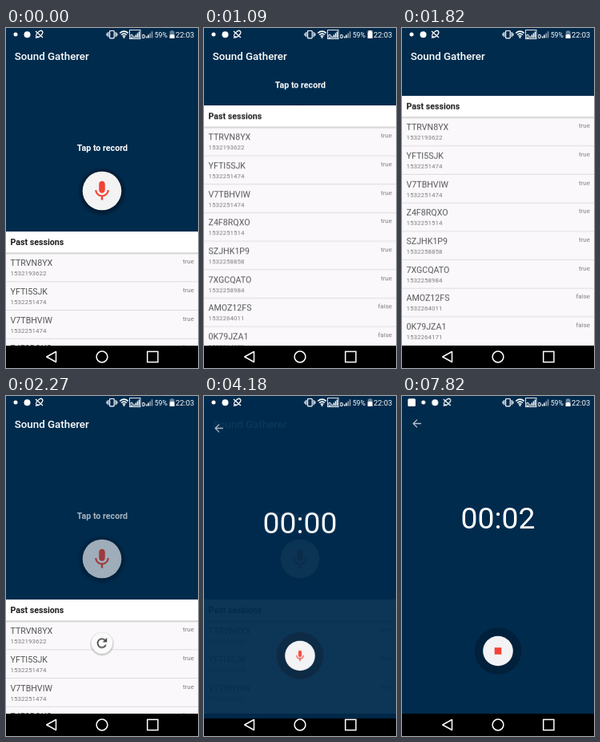
An HTML page that plays this animation: 240x426 px, repeating every 8000 ms.

```html
<!DOCTYPE html>
<html lang="en">
<head>
<meta charset="utf-8">
<title>Recorder</title>
<style>
html, body { margin: 0; width: 100%; height: 100%; overflow: hidden; background: #000; }
svg { display: block; width: 100vw; height: 100vh; font-family: Roboto, "Open Sans", sans-serif; }
.move, .fade, .pull, .spin, .press, .screen, .tap, .mic, .stop, .note, .icons, .s0, .s1, .s2 {
  animation: 8s linear infinite;
}
.move { animation-name: move; }
.fade { animation-name: fade; }
.pull { animation-name: pull; }
.spin { animation-name: spin; }
.press { animation-name: press; }
.screen { animation-name: screen; }
.tap { animation-name: tap; }
.mic, .stop, .note, .icons, .s0, .s1, .s2 { animation-timing-function: step-end; }
.mic { animation-name: mic; }
.stop { animation-name: stop; }
.note { animation-name: note; }
.icons { animation-name: icons; }
.s0 { animation-name: s0; }
.s1 { animation-name: s1; }
.s2 { animation-name: s2; }
.charge { animation: charge 2s step-end -470ms infinite; }

/* Sheet drag; --k sets the parallax share */
@keyframes move {
  0%, 7.2% { transform: none; animation-timing-function: cubic-bezier(.4, 0, .8, .9); }
  13.625% { transform: translateY(calc(var(--k) * -157.5px)); animation-timing-function: ease-out; }
  17.5% { transform: translateY(calc(var(--k) * -201px)); animation-timing-function: cubic-bezier(.6, 0, .9, .6); }
  22.75% { transform: translateY(calc(var(--k) * -170.5px)); animation-timing-function: cubic-bezier(.3, .2, .6, 1); }
  27.25%, 100% { transform: none; }
}
@keyframes fade {
  0%, 14% { opacity: 1; }
  21.5%, 23.5% { opacity: 0; }
  31%, 100% { opacity: 1; }
}
@keyframes pull {
  0%, 27% { transform: translateY(-44px); }
  28.375% { transform: none; animation-timing-function: ease-out; }
  30.6%, 32.5% { transform: translateY(15px); }
  34%, 100% { transform: translateY(12px); }
}
@keyframes spin {
  0%, 27% { transform: rotate(-60deg); }
  28.375% { transform: none; }
  30.6% { transform: rotate(50deg); }
  35% { transform: rotate(260deg) scale(1); }
  37.4%, 100% { transform: rotate(330deg) scale(0); }
}
@keyframes press { 0%, 49.8% { opacity: 0; } 51.5%, 100% { opacity: .12; } }
@keyframes screen {
  0%, 51% { opacity: 0; transform: translateY(34px); animation-timing-function: ease-out; }
  52.25% { opacity: .95; transform: translateY(6px); animation-timing-function: ease-out; }
  53.6% { opacity: 1; transform: translateY(1px); }
  55.5%, 100% { opacity: 1; transform: none; }
}
@keyframes tap {
  0%, 69.2% { opacity: 0; }
  71.5%, 75% { opacity: .06; }
  77.9%, 100% { opacity: 0; }
}
@keyframes mic { 0% { opacity: 1; } 72.5%, 100% { opacity: 0; } }
@keyframes stop { 0% { opacity: 0; } 72.5%, 100% { opacity: 1; } }
@keyframes note { 0% { opacity: 0; } 72.5%, 100% { opacity: 1; } }
@keyframes icons { 0% { transform: none; } 72.5%, 100% { transform: translateX(14.7px); } }
@keyframes s0 { 0% { opacity: 1; } 85.2%, 100% { opacity: 0; } }
@keyframes s1 { 0% { opacity: 0; } 85.2% { opacity: 1; } 97.7%, 100% { opacity: 0; } }
@keyframes s2 { 0% { opacity: 0; } 97.7%, 100% { opacity: 1; } }
@keyframes charge {
  0% { transform: scaleY(.5); }
  25% { transform: scaleY(.62); }
  50% { transform: scaleY(.85); }
  75%, 100% { transform: none; }
}
</style>
</head>
<body>
<svg viewBox="0 0 240 426" preserveAspectRatio="none">
  <defs>
    <path id="micShape" fill="#f44336" d="M12 14c1.66 0 3-1.34 3-3V5c0-1.66-1.34-3-3-3S9 3.34 9 5v6c0 1.66 1.34 3 3 3zm5.3-3c0 3-2.54 5.1-5.3 5.1S6.7 14 6.7 11H5c0 3.41 2.72 6.23 6 6.72V21h2v-3.28c3.28-.48 6-3.3 6-6.72z"/>
    <radialGradient id="glow">
      <stop offset=".78" stop-color="#001426" stop-opacity=".75"/>
      <stop offset="1" stop-color="#001426" stop-opacity="0"/>
    </radialGradient>
    <radialGradient id="soft">
      <stop offset=".8" stop-opacity=".28"/>
      <stop offset="1" stop-opacity="0"/>
    </radialGradient>
    <linearGradient id="edge" x2="0" y2="1">
      <stop stop-color="#000" stop-opacity=".24"/>
      <stop offset="1" stop-color="#000" stop-opacity="0"/>
    </linearGradient>
    <clipPath id="listArea"><path d="M0 282H240V398H0z"/></clipPath>
  </defs>

  <rect width="240" height="426" fill="#002b4d"/>

  <!-- Home -->
  <g class="move" style="--k:.5">
    <g class="fade">
      <text x="120.4" y="154" font-size="10.67" font-weight="700" fill="#fff" text-anchor="middle">Tap to record</text>
      <circle cx="120" cy="205" r="31" fill="url(#glow)"/>
      <circle cx="120" cy="204" r="24.3" fill="#f3f3f3"/>
      <use href="#micShape" transform="translate(105 189.2) scale(1.25)"/>
      <circle class="press" cx="120" cy="204" r="24.3"/>
    </g>
  </g>
  <text x="10.7" y="39.7" font-size="13.33" font-weight="500" fill="#fff">Sound Gatherer</text>
  <g class="move" style="--k:1">
    <rect y="255" width="240" height="400" fill="#faf8fb"/>
    <g id="rows"></g>
    <rect y="255" width="240" height="27" fill="#fff"/>
    <rect y="281.5" width="240" height="2.5" fill="url(#edge)"/>
    <text x="5.5" y="272" font-size="10.67" font-weight="700" fill="#1c1c1c">Past sessions</text>
  </g>
  <g clip-path="url(#listArea)">
    <g class="pull">
      <g transform="translate(120 309.5)">
        <g class="spin">
          <circle cy="1" r="15.5" fill="url(#soft)"/>
          <circle r="13.3" fill="#fafafa"/>
          <path d="M4.9 2.2A5.4 5.4 0 1 1 3.6 -4" fill="none" stroke="#444" stroke-width="1.7"/>
          <path d="M6.2 -6.7V-1.2H.7z" fill="#444"/>
        </g>
      </g>
    </g>
  </g>
  <rect y="398" width="240" height="28"/>

  <!-- Recorder -->
  <g class="screen">
    <rect width="240" height="398" fill="#002b4d"/>
    <rect y="398" width="240" height="28"/>
    <path transform="translate(10.5 26.5) scale(.667)" fill="#b5c2cc" d="M20 11H7.83l5.59-5.59L12 4l-8 8 8 8 1.41-1.41L7.83 13H20z"/>
    <g font-size="37.33" fill="#fff" text-anchor="middle">
      <text class="s0" x="120" y="166">00:00</text>
      <text class="s1" x="120" y="166">00:01</text>
      <text class="s2" x="120" y="166">00:02</text>
    </g>
    <circle cx="120" cy="319.5" r="29.3" fill="#00203b"/>
    <circle cx="120" cy="319.5" r="18.8" fill="#f3f2f5"/>
    <g class="mic"><use href="#micShape" transform="translate(111.6 311.4) scale(.7)"/></g>
    <rect class="stop" x="115.7" y="315.2" width="8.6" height="8.6" fill="#f44336"/>
    <circle class="tap" cx="120" cy="319.5" r="18.8"/>
  </g>

  <!-- Status bar -->
  <g fill="#fff">
    <rect class="note" x="7.3" y="3.3" width="9.6" height="9.6" rx="1.5"/>
    <g class="icons">
      <circle cx="12" cy="8" r="2.5"/>
      <circle cx="26.5" cy="8.3" r="4"/>
      <g fill="none" stroke="#fff" stroke-width="1.3">
        <ellipse cx="41.7" cy="7.5" rx="5" ry="2.7" transform="rotate(-45 41.7 7.5)"/>
        <path d="M37 4l9 8M37 12.5l3-2"/>
      </g>
    </g>
    <g fill="none" stroke="#fff" stroke-width="1.2">
      <rect x="129.6" y="3.5" width="5.6" height="9.3" rx=".8"/>
      <path d="M127.7 5v6.3M137.2 5v6.3M126 6.5v3.3M138.9 6.5v3.3"/>
      <path d="M142.3 6.3q5.2-4.3 10.4 0M144 8.5q3.5-2.8 7 0M145.7 10.5q1.8-1.4 3.6 0" stroke-width="1.6"/>
      <rect x="154.6" y="2.6" width="13.4" height="11" stroke-width=".9"/>
    </g>
    <circle cx="147.5" cy="12" r="1"/>
    <path d="M159.5 10.5h1.5v2h-1.5zM161.6 8.5h1.5v4h-1.5zM163.7 6.5h1.4v6h-1.4zM165.7 4.5h1.4v8h-1.4z"/>
    <path d="M175 10.5h1.5v2H175zM177.2 8.5h1.5v4h-1.5z"/>
    <path d="M179.5 6.5h1.5v6h-1.5zM181.8 4.2h1.5v8.3h-1.5z" opacity=".55"/>
    <g font-size="6.5" font-weight="700">
      <text x="155.3" y="12.6">D</text>
      <text x="170" y="12.6">D</text>
    </g>
    <text x="185.7" y="11.7" font-size="8.67">59%</text>
    <path d="M206.3 3h2.6v1H210.5v9H204.7V4h1.6z" opacity=".4"/>
    <g transform="translate(207.6 13)"><path class="charge" d="M-2.9 0V-9H-1.3V-10H1.3V-9H2.9V0z"/></g>
    <text x="235.3" y="11.7" font-size="9.33" text-anchor="end">22:03</text>
  </g>

  <!-- Navigation bar -->
  <g fill="none" stroke="#fff" stroke-width="1.5">
    <path d="M62.5 405.5V418.5L50.7 412z" stroke-linejoin="round"/>
    <circle cx="120" cy="412" r="6.9"/>
    <rect x="176.7" y="405.4" width="13.2" height="13.2"/>
  </g>
</svg>
<script>
const sessions = `TTRVN8YX 1532193622 true
YFTI5SJK 1532251474 true
V7TBHVIW 1532251474 true
Z4F8RQXO 1532251514 true
SZJHK1P9 1532258858 true
7XGCQATO 1532258984 true
AMOZ12FS 1532264011 false
0K79JZA1 1532264171 false
Q3MWL7DE 1532264305 true`;

document.getElementById('rows').innerHTML = sessions.split('\n').map((line, i) => {
  const [id, stamp, sent] = line.split(' ');
  return `<g transform="translate(0 ${282.3 + i * 35.67})">
    <text x="5.5" y="16" font-size="10.67" fill="#555">${id}</text>
    <text x="5.5" y="28" font-size="8" fill="#7c7c7c">${stamp}</text>
    <text x="235" y="13" font-size="8" fill="#7c7c7c" text-anchor="end">${sent}</text>
    <rect y="35.2" width="240" height=".8" fill="#d6d6d6"/>
  </g>`;
}).join('');
</script>
</body>
</html>
```
